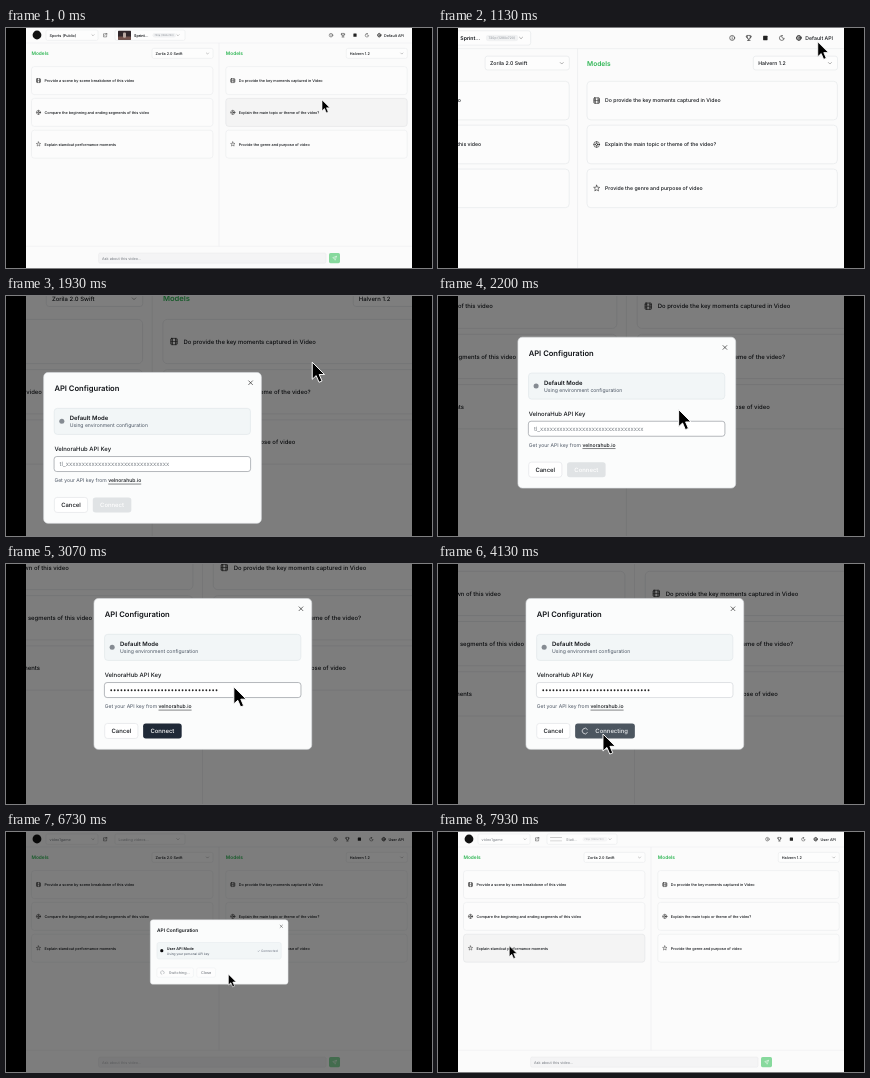
These frames come from a looping animation (426 by 240 pixels, 8.07 s). An HTML page:

```html
<!DOCTYPE html>
<html lang="en">
<head>
<meta charset="utf-8">
<title>API configuration walkthrough</title>
<style>
  html, body { margin: 0; width: 100%; height: 100%; overflow: hidden; background: #000; }
  svg { display: block; width: 100vw; height: 100vh; }
  text { font-family: Inter, "Liberation Sans", sans-serif; text-rendering: geometricPrecision; white-space: pre; }
  .icon { fill: none; stroke: #222; stroke-width: .42; stroke-linecap: round; stroke-linejoin: round; }
  .spin { fill: none; stroke-width: .45; stroke-linecap: round; }
</style>
</head>
<body>
<svg id="stage" viewBox="0 0 426 240">
  <defs><clipPath id="view"><rect x="20" width="386" height="240"/></clipPath></defs>
  <g clip-path="url(#view)"><g id="camera"></g></g>
</svg>
<script>
const LOOP = 8070;
const OPEN = 1340, PASTE = 2730, CONNECT = 3960, CONNECTED = 4400, RESTORE = 5600, CLOSE = 7400;
const BODY = 3.75, SMALL = 3.21, TITLE = 4.82;
const INK = '#111418', MUTED = '#6b7280', LINE = '#e1e3e6';

// ---- markup helpers; text is placed by its vertical centre ----
const text = (x, y, str, size = BODY, weight = 500, fill = INK, extra = '') =>
  `<text x="${x}" y="${y + size * .36}" font-size="${size}" font-weight="${weight}" fill="${fill}" ${extra}>${str}</text>`;
const box = (x, y, w, h, r, fill, stroke = 'none', extra = '') =>
  `<rect x="${x}" y="${y}" width="${w}" height="${h}" rx="${r}" fill="${fill}" stroke="${stroke}" stroke-width=".4" ${extra}/>`;
const icon = (x, y, body) => `<g class="icon" transform="translate(${x} ${y})">${body}</g>`;
const group = (id, body) => `<g id="${id}">${body}</g>`;
const chevron = (x, y) => icon(x, y, '<path d="M-1.1 -.5L0 .6L1.1 -.5" stroke="#777"/>');
const cross = (x, y) => icon(x, y, '<path d="M-1.2 -1.2L1.2 1.2M1.2 -1.2L-1.2 1.2"/>');
const spinner = (id, x, y, color) =>
  `<g transform="translate(${x} ${y})"><path id="${id}" class="spin" stroke="${color}" d="M1.8 0A1.8 1.8 0 1 1 .56 -1.71"/></g>`;

const star = Array.from({ length: 10 }, (_, i) => {
  const r = i % 2 ? 1.05 : 2.3, a = i * Math.PI / 5 - Math.PI / 2;
  return `${(r * Math.cos(a)).toFixed(2)},${(r * Math.sin(a)).toFixed(2)}`;
}).join(' ');
const cardIcons = [
  '<rect x="-2" y="-2" width="4" height="4" rx=".5"/><path d="M-1 -2V2M1 -2V2M-2 0H2M-2 -1H-1M-2 1H-1M1 -1H2M1 1H2"/>',
  '<circle r="2.1"/><circle r=".8"/><path d="M0 -2.1V-.8M0 .8V2.1M-2.1 0H-.8M.8 0H2.1"/>',
  `<polygon points="${star}"/>`
];
const gear = '<circle r="1.35"/><circle r=".5"/><circle r="1.75" stroke-width=".7" stroke-dasharray=".65 .725"/>';

const rowY = [52.6, 84.4, 116.2];
const columns = [
  { x: 25.5, model: 'Zorila 2.0 Swift', prompts: [
    'Provide a scene by scene breakdown of this video',
    'Compare the beginning and ending segments of this video',
    'Explain standout performance moments'] },
  { x: 219.8, model: 'Halvern 1.2', prompts: [
    'Do provide the key moments captured in Video',
    'Explain the main topic or theme of the video?',
    'Provide the genre and purpose of video'] }
];

const column = ({ x, model, prompts }, c) =>
  text(x, 25.5, 'Models', TITLE, 600, '#2cb552') +
  box(x + 120.5, 20.4, 61, 10, 1.7, '#fdfdfd', LINE) +
  text(x + 124, 25.5, model) + chevron(x + 176, 25.5) +
  prompts.map((p, r) =>
    box(x, rowY[r] - 14, 181.4, 28, 2.8, '#fcfcfc', LINE, `id="card${c}${r}"`) +
    icon(x + 7, rowY[r], cardIcons[r]) + text(x + 13, rowY[r], p)).join('');

const header =
  '<circle cx="31" cy="7" r="4.4" fill="#111"/>' +
  box(40, 2, 52, 10.4, 1.7, '#fdfdfd', LINE) + chevron(87, 7.2) +
  icon(99, 7.2, '<path d="M-.3 -1.4H-1.5V1.7H1.6V.5M.5 -1.7H1.8V-.4M1.8 -1.7L-.2 .3"/>') +
  box(109, 2, 70, 10.4, 1.7, '#fdfdfd', LINE) + chevron(172, 7.2) +
  group('before',
    text(43.6, 7.2, 'Sports (Public)') +
    box(112, 2.7, 13, 9, .6, '#30262a') + box(112, 8.6, 13, 3.1, .6, '#71504a') + box(117, 4.5, 3, 5.2, 1, '#b9a9a2') +
    text(128, 7.2, 'Sprint...', BODY, 600) +
    box(146.5, 4.9, 23.5, 4.7, 2.3, '#f1f2f3') + text(148.4, 7.2, '720p (1280x720)', 2.4, 400, '#8a8f96')) +
  group('after', text(43.6, 7.2, 'video1game', BODY, 400, '#7d8187')) +
  group('loading', text(112.5, 7.2, 'Loading videos...', BODY, 400, '#a3a6aa')) +
  group('loaded',
    box(112, 5, 12, .7, .3, '#bbb') + box(112, 8.5, 12, .7, .3, '#ccc') +
    text(128, 7.2, 'Stati...', BODY, 500, '#9a9da1') +
    box(144.5, 4.9, 25, 4.7, 2.3, '#f5f5f6') + text(146.3, 7.2, '720p (1280x720)', 2.4, 400, '#b3b6ba')) +
  group('tools',
    icon(325, 7.2, '<circle r="1.8"/><path d="M0 -.1V.9M0 -.9V-.85"/>') +
    icon(337, 7.2, '<path d="M-1.1 -1.8H1.1V-.2A1.1 1.1 0 0 1 -1.1 -.2ZM-1.1 -1.3H-1.9Q-1.9 0 -1 0M1.1 -1.3H1.9Q1.9 0 1 0M0 .9V1.8M-1 1.8H1"/>') +
    box(347.4, 5.6, 3.2, 3.2, .3, '#222') +
    icon(361, 7.2, '<path d="M.1 -1.7A1.3 1.3 0 0 0 1.7 .2A1.75 1.75 0 1 1 .1 -1.7Z"/>') +
    icon(373.3, 7.2, gear)) +
  text(398, 7.2, '', BODY, 500, INK, 'id="apiLabel" text-anchor="end"');

const footer =
  '<path d="M20 218.3H406" stroke="#e4e6e8" stroke-width=".4"/>' +
  box(92.6, 225, 227.4, 10.2, 1.6, '#f4f4f5', '#e2e3e5') +
  text(96, 230.2, 'Ask about this video...', BODY, 400, '#777c83', 'id="ask"') +
  box(323, 225, 11, 10.2, 1.6, '#87d99d') +
  icon(328.5, 230.1, '<path d="M1.8 -1.8L-1.8 -.5L-.3 .3L.5 1.8ZM-.3 .3L1.8 -1.8" stroke="#fff"/>');

const page =
  box(0, -40, 426, 300, 0, '#fbfbfb') +
  '<path d="M20 15H406M213 15V218.3" stroke="#e4e6e8" stroke-width=".4"/>' +
  header + columns.map(column).join('') + footer;

// ---- dialogs, drawn from their top edge ----
const dialog = (id, top, h, dot, mode, note, body) =>
  `<g id="${id}"><g transform="translate(0 ${top})">` +
  box(144.3, 0, 137.8, h, 2.8, '#fbfcfc', '#d9dcdf') +
  text(151.1, 10.3, 'API Configuration', TITLE, 600) + cross(275.3, 6.5) +
  box(151, 22.7, 124.2, 16.5, 2, '#f2f6f7', '#dfe6e9') +
  `<circle cx="155.8" cy="30.9" r="1.6" fill="${dot}"/>` +
  text(160.8, 28.8, mode, BODY, 600) + text(160.8, 33.6, note, SMALL, 400, '#4b5563') +
  body + '</g></g>';

const keyDialog = dialog('keyDialog', 72.2, 95.5, '#858b92', 'Default Mode', 'Using environment configuration',
  text(151.1, 48.3, 'VelnoraHub API Key') +
  box(150.9, 53.2, 124.4, 9.5, 1.7, '#fff', '#8b9096', 'id="field"') +
  group('hint', text(154.4, 57.9, 'tl_' + 'x'.repeat(32), BODY, 400, '#7b8087')) +
  '<path id="secret" d="M155.2 58.1H222" stroke="#222" stroke-width="1.15" stroke-linecap="round" stroke-dasharray=".01 2.14"/>' +
  text(151.1, 68.3, 'Get your API key from <tspan font-weight="500" fill="#111418" text-decoration="underline">velnorahub.io</tspan>', SMALL, 400, '#4b5563') +
  box(151.1, 79.1, 21, 9.5, 1.7, '#fff', LINE) + text(161.6, 83.9, 'Cancel', BODY, 500, INK, 'text-anchor="middle"') +
  group('connect',
    box(175.4, 79.1, 24.4, 9.5, 1.7, '#e0e3e5', 'none', 'id="connectBox"') +
    text(187.6, 83.9, 'Connect', BODY, 500, '#fff', 'text-anchor="middle"')) +
  group('connecting',
    box(175.4, 79.1, 37.8, 9.5, 1.7, '#4c5660') + spinner('spinA', 181.7, 83.9, '#e8eaec') +
    text(188.2, 83.9, 'Connecting', BODY, 500, '#eceef0')));

const userDialog = dialog('userDialog', 87.8, 64.4, '#090a0c', 'User API Mode', 'Using your personal API key',
  text(271.6, 30.9, '✓ Connected', SMALL, 400, MUTED, 'text-anchor="end"') +
  box(150.9, 48, 36.5, 9.5, 1.7, '#fdfdfd', '#e8eaec') + spinner('spinB', 156.4, 52.8, '#8d9197') +
  text(162.8, 52.8, 'Switching...', BODY, 500, '#858a90') +
  box(190.8, 48, 18.8, 9.5, 1.7, '#fdfdfd', '#e8eaec') +
  text(200.2, 52.8, 'Close', BODY, 500, '#767b82', 'text-anchor="middle"'));

const arrow = '<path d="M0 0V10.8L2.5 8.5L4.3 12.7L6.2 11.9L4.4 7.8H7.8Z" fill="#000" stroke="#fff" stroke-width=".6" stroke-linejoin="round"/>';

document.getElementById('camera').innerHTML =
  group('page', page) + box(0, 0, 426, 240, 0, '#000', 'none', 'id="shade"') +
  group('modal', keyDialog + userDialog) + group('cursor', arrow);

// ---- motion: critically damped springs chained by start time ----
const spring = ms => {
  const k = Math.max(0, ms) * .0093;
  return 1 - (1 + k) * Math.exp(-k);
};
const follow = (steps, t) => steps[0][1].map((start, axis) =>
  steps.slice(1).reduce((v, [at, to], i) => v + (to[axis] - steps[i][1][axis]) * spring(t - at), start));

// scale, x, y
const cameraPath = [
  [0, [1, 0, 0]], [890, [1.58, -235.5, 0]], [1760, [1.58, -140, -79.6]], [5540, [1, 0, 0]]
];
const cursorPath = [
  [0, [316, 72]], [40, [387, 10]], [1760, [233, 128]], [3060, [193, 158]],
  [4250, [222.4, 142.2]], [7370, [66, 112.8]]
];

const el = Object.fromEntries([...document.querySelectorAll('[id]')].map(e => [e.id, e]));
const show = (id, on) => { el[id].style.display = on ? '' : 'none'; };
const move = (id, value) => el[id].setAttribute('transform', value);
const fade = ms => { const p = Math.min(1, Math.max(0, ms / 200)); return 1 - (1 - p) ** 2; };

function draw(t) {
  const [s, x, y] = follow(cameraPath, t);
  const [cx, cy] = follow(cursorPath, t);
  move('camera', `translate(${x} ${y}) scale(${s})`);
  move('cursor', `translate(${cx} ${cy})`);
  move('page', `translate(0 ${t >= CONNECT && t < RESTORE ? 16.4 : 0})`);

  const vis = fade(t - OPEN) * (1 - fade(t - CLOSE));
  const zoom = .95 + .05 * vis;
  el.shade.setAttribute('opacity', vis * .5);
  el.modal.setAttribute('opacity', vis);
  move('modal', `translate(213.2 120) scale(${zoom}) translate(-213.2 -120)`);

  const switched = t >= CONNECTED;
  show('keyDialog', !switched);
  show('userDialog', switched);
  show('hint', t < PASTE);
  show('secret', t >= PASTE);
  el.field.setAttribute('stroke', t < CONNECT ? '#8b9096' : '#cfd3d7');
  show('connect', t < CONNECT);
  show('connecting', t >= CONNECT);
  el.connectBox.setAttribute('fill', t < PASTE ? '#e0e3e5' : '#1f2937');
  move('spinA', `rotate(${t * .36 - 10})`);
  move('spinB', `rotate(${t * .36 - 155})`);

  show('before', !switched);
  show('after', switched);
  show('loading', switched && t < CLOSE);
  show('loaded', t >= CLOSE);
  el.apiLabel.textContent = switched ? 'User API' : 'Default API';
  move('tools', `translate(${switched ? 4.4 : 0} 0)`);
  el.ask.setAttribute('opacity', switched && t < CLOSE ? .5 : 1);

  columns.forEach((col, c) => rowY.forEach((ry, r) => {
    const over = vis < .5 && cx > col.x && cx < col.x + 181.4 && Math.abs(cy - ry) < 14;
    const card = el[`card${c}${r}`];
    card.setAttribute('fill', over ? '#f4f4f4' : '#fcfcfc');
    card.setAttribute('stroke', over ? '#d6d8db' : LINE);
  }));
}

const begin = performance.now();
function tick() {
  draw((performance.now() - begin) % LOOP);
  requestAnimationFrame(tick);
}
tick();
</script>
</body>
</html>
```
